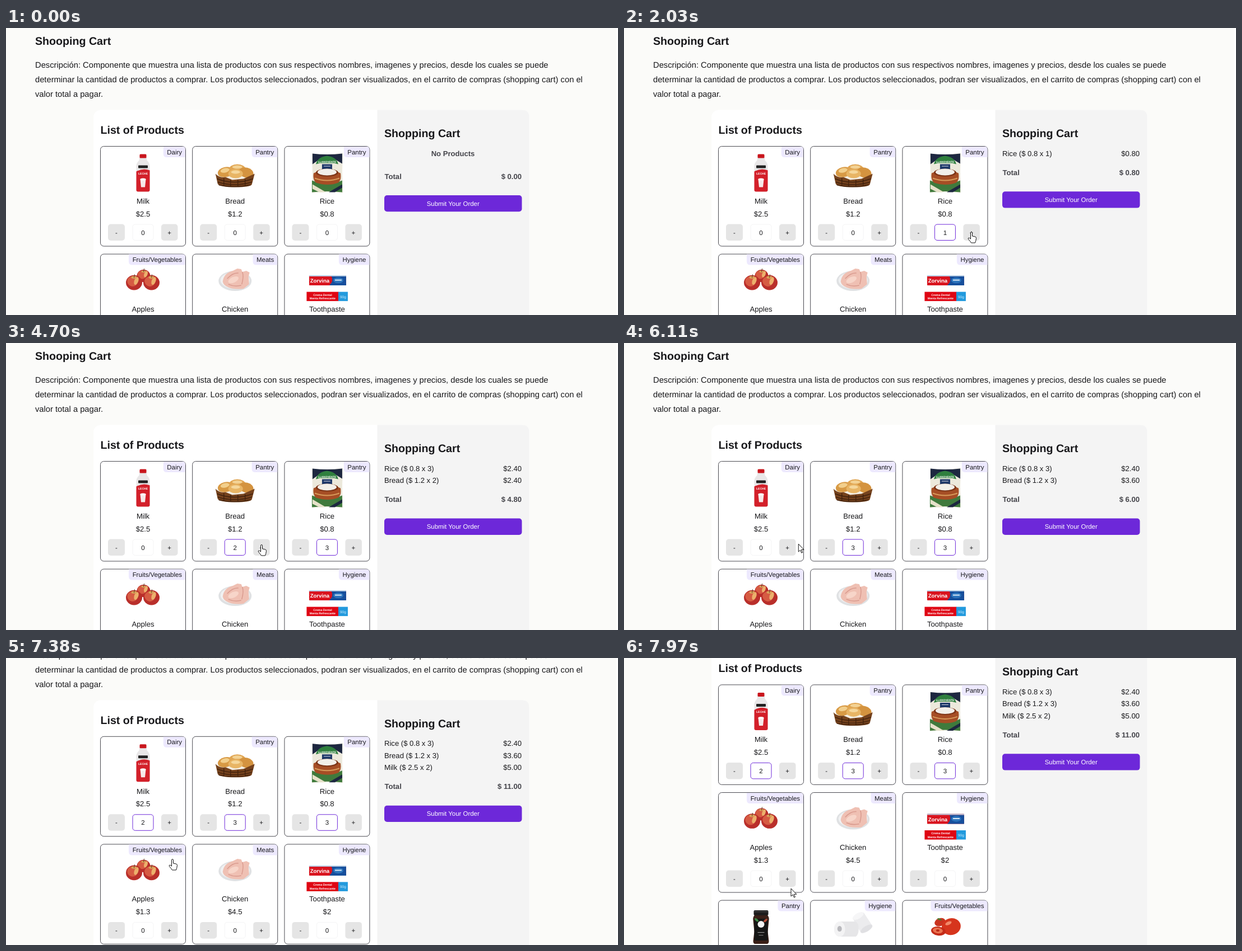
Write an HTML page that moves like this. It is 1092 px wide and 513 px high and loops after 8 s.

```html
<!DOCTYPE html>
<html lang="es">
<head>
<meta charset="utf-8">
<title>Shooping Cart</title>
<style>
html, body { margin: 0; width: 100%; height: 100%; overflow: hidden; background: #fbfbf9; }
svg { display: block; }
text { font-family: "Liberation Sans", Arial, sans-serif; text-rendering: geometricPrecision; white-space: pre; }
</style>
</head>
<body>
<svg width="1092" height="513" viewBox="0 0 1092 513">
  <g id="page"></g>
  <path fill="#fff" d="M1089 0h3v513h-3z"/>
  <path id="cursor" stroke="#111" stroke-linejoin="round"/>
</svg>
<script>
const LOOP = 8000, BIG = 19.64, LEAD = 14.73, BODY = 13.09, SMALL = 11.45;
const CARD = { x: 168.5, y: 211.5, dx: 164.2, dy: 192.6, w: 152, h: 178.5 };
const page = document.getElementById('page');
const cursor = document.getElementById('cursor');
const ctx = document.createElement('canvas').getContext('2d');
ctx.font = '100px "Liberation Sans", Arial, sans-serif';

// Drawing helpers
const text = (x, y, s, size = BODY, more = '') =>
  `<text x="${x}" y="${y}" font-size="${size}" fill="#18181b" ${more}>${s}</text>`;
const mid = (x, y, s, size, more = '') => text(x, y, s, size, 'text-anchor="middle" ' + more);
const end = (x, y, s, size, more = '') => text(x, y, s, size, 'text-anchor="end" ' + more);
const rect = (x, y, w, h, fill, r = 0, more = '') =>
  `<rect x="${x}" y="${y}" width="${w}" height="${h}" rx="${r}" fill="${fill}" ${more}/>`;
const oval = (x, y, rx, ry, fill, turn = 0) =>
  `<ellipse cx="${x}" cy="${y}" rx="${rx}" ry="${ry}" fill="${fill}" transform="rotate(${turn} ${x} ${y})"/>`;
const path = (d, fill, more = '') => `<path d="${d}" fill="${fill}" ${more}/>`;
const bold = 'style="font-weight:700"';
const white = 'style="font-weight:700;fill:#fff"';
const grey = 'style="font-weight:700;fill:#45454b"';

// Pictures: x from the middle of the card, y from its top
const milk = path('M-6 18h12l1 7q5 5 5 10v43q0 3-3 3h-18q-3 0-3-3V35q0-5 5-10z', '#e9e7e8')
  + rect(-6, 14, 12, 7, '#c9161d', 1.5)
  + path('M-12 45q12-7 24-2v35q0 3-3 3h-18q-3 0-3-3z', '#d3202a')
  + rect(-8.5, 34, 17, 5, '#222', 1)
  + mid(0, 50.5, 'LECHE', 5, white)
  + path('M-5 59h10l-1.5 14h-7z', '#f6e9e9') + oval(0, 59, 5, 2, '#fff');

const bread = oval(0, 54, 32, 9, '#f3eee4')
  + oval(-17, 46, 14, 9, '#d89a45', -12) + oval(4, 41, 15, 9, '#e0a552')
  + oval(20, 47, 13, 9, '#d4933f', 14) + oval(1, 49, 13, 8, '#e8b565')
  + oval(-18, 43, 8, 4, '#f2cf8c', -12) + oval(4, 37, 9, 3, '#f3d294') + oval(1, 46, 8, 3, '#f5d79c')
  + path('M-35 49q7 8 18 6l12 5 20-2 20-9-5 19q-2 5-29 5-29 0-32-6z', '#75421d')
  + path('M-32 58q30 12 64 0M-31 64q30 9 61 0M-29 69q28 6 56 0M-20 57v14M-8 60v12M5 60v12M18 59v12',
    'none', 'stroke="#42220d" stroke-width="1.4"');

const rice = path('M-27 13q27 3 55-1l-1 35 1 36q-27-3-55 0l1-35z', '#ece9dc')
  + path('M-26 13q26 3 53 0v18l-15-9h-24l-14 10z', '#1d2740')
  + path('M-27 61l14 5 27 0 13-5v21q-27-3-54 0z', '#3f7a3c')
  + path('M-26 68l24 14h-12l-12-6z', '#e6e1c9') + path('M3 82l24-14v6l-13 8z', '#1d2740')
  + path('M-20 32q3-13 20-15 17 2 20 15l-7-2h-26z', '#2f7f3e')
  + mid(0, 29.5, 'LLANOVENTE', 4.8, white)
  + rect(-9, 32, 18, 10, '#1c3768') + rect(-6, 35, 12, 1, '#d7d9e4')
  + path('M-24 48q24-12 48 0 2 12-4 17-18 7-40 0-6-6-4-17z', '#a64e25')
  + oval(0, 47, 20, 7, '#7d3517') + oval(0, 46, 17, 6, '#f2efe9')
  + path('M-22 57q22 8 44 0', 'none', 'stroke="#d79b5a" stroke-width="2"');

const apple = (x, y, r) => oval(x, y, r, r * .92, '#b92f2b')
  + oval(x - 3, y - 2, r * .65, r * .6, '#d65b43', 25) + oval(x + 4, y - 3, r * .25, r * .5, '#ecb06c', 20)
  + oval(x, y - r * .65, r * .35, r * .16, '#d9a05a')
  + path(`M${x} ${y - r * .6}l1-6`, 'none', 'stroke="#5b3a20"');
const apples = apple(1, 39, 12) + apple(-16, 51, 14.5) + apple(15, 51, 14.5);

const chicken = oval(0, 48, 29.5, 18, '#dfe1e3') + oval(0, 47, 26, 15, '#f0f1f2')
  + path('M-22 49q2-15 18-19l8-4 7 1 2 5 7-2 6 3-2 7 1 14-10 8q-20 2-30-4-6-3-7-9z', '#efc0b3')
  + path('M-14 44q10-11 20-10M13 32q3 8-1 22M-12 54q11 5 23 2', 'none', 'stroke="#d99a8e" stroke-width="1.5"')
  + oval(-3, 46, 10, 5, '#f7d5c9', -25);

const toothpaste = rect(-32, 38, 66, 18, '#d9141f', 1) + path('M8 40h26v16H4q8-7 4-16z', '#164f9c')
  + path('M-32 38h66v2H-32z', '#b7cde4') + oval(20, 47, 9, 5, '#2d75bd') + rect(14, 45.5, 12, 2, '#dceaf7')
  + mid(-13, 51, 'Zorvina', 9.5, white)
  + rect(-36.5, 67.5, 57, 16.5, '#df0613') + rect(20, 67.5, 17, 16.5, '#229add')
  + mid(-8, 74.5, 'Crema Dental', 5.2, white) + mid(-8, 81, 'Menta Refrescante', 5.2, white)
  + mid(28.5, 78.5, '90g', 6.5, 'style="fill:#d5efff"');

const coffee = path('M-11 26h22q4 4 3 10l-2 20 2 17q0 5-4 5h-20q-4 0-4-5l2-17-2-20q-1-6 3-10z', '#3b2018')
  + rect(-13, 18, 26, 9, '#1d1c1c', 2) + rect(-12, 20, 24, 1, '#555')
  + rect(-12, 33, 24, 39, '#161616', 2)
  + oval(-8, 35, 4, 2, '#3c8a45', 40) + oval(8, 36, 4, 2, '#b64b35', -40)
  + oval(0, 43, 6, 6, '#f4f4f4') + rect(-6, 57, 12, 1, '#aaa') + rect(-4, 62, 8, 1, '#888');

const paper = path('M-1 32l20-10 15 23-20 13z', '#ececee') + oval(24, 51, 12, 5, '#e0e0e3', -32)
  + oval(9, 28, 11, 5, '#f6f6f7', -30)
  + path('M-24 38H5q5 3 5 13t-5 14h-29z', '#e6e6e8') + oval(-24, 51.5, 10, 13.5, '#f3f3f4')
  + oval(-24, 51, 4, 5, '#b9b9bd');

const tomatoes = oval(-9, 39, 10, 7, '#c93420', -20) + oval(11, 47, 17, 15, '#d6351d', -12)
  + oval(6, 41, 6, 3, '#f08a6b', -25) + oval(-12, 55, 13, 8, '#c42b18', 8)
  + oval(-13, 54, 9, 5, '#ea7350', 8) + oval(-13, 54, 3, 2, '#bb2a18') + oval(-10, 34, 4, 1.5, '#4b7d31', 20);

const products = [
  ['Milk', 2.5, 'Dairy', milk], ['Bread', 1.2, 'Pantry', bread], ['Rice', .8, 'Pantry', rice],
  ['Apples', 1.3, 'Fruits/Vegetables', apples], ['Chicken', 4.5, 'Meats', chicken],
  ['Toothpaste', 2, 'Hygiene', toothpaste],
  ['Coffee', 3, 'Pantry', coffee], ['Paper', 2, 'Hygiene', paper], ['Tomatoes', 1, 'Fruits/Vegetables', tomatoes]
];

// Clicks on the plus buttons: time, product index
const clicks = [[1990, 2], [2320, 2], [2720, 2], [4140, 1], [4530, 1], [4930, 1], [6360, 0], [6660, 0]];

function card([name, price, tag, picture], i, qty) {
  const x = CARD.x + i % 3 * CARD.dx, y = CARD.y + Math.floor(i / 3) * CARD.dy;
  const left = CARD.w - 13 - ctx.measureText(tag).width * SMALL / 100;
  return `<g transform="translate(${x} ${y})">`
    + rect(0, 0, CARD.w, CARD.h, '#fff', 6, 'stroke="#4b4b52"')
    + path(`M${left} .5H147Q151.5 .5 151.5 6V19.5H${left + 6}q-6 0-6-6z`, '#ede9fe')
    + end(145.5, 14.2, tag, SMALL)
    + `<g transform="translate(76 0)">${picture}</g>`
    + mid(76, 102.5, name) + mid(76, 125, '$' + price)
    + rect(13.5, 139, 30, 29.5, '#e5e5e5', 5) + mid(28.5, 158, '-', SMALL)
    + rect(57.5, 139.5, 37, 28.5, '#fff', 4.5, `stroke="${qty ? '#6d28d9' : '#f4f4f5'}"`) + mid(76, 158, qty, SMALL)
    + rect(108.5, 139, 29.5, 29.5, '#e5e5e5', 5) + mid(123, 158, '+', SMALL) + '</g>';
}

function cart(items) {
  let sum = 0, rows = '';
  [...items].forEach(([i, n], k) => {
    const [name, price] = products[i], y = 228.7 + 21.3 * k;
    sum += price * n;
    rows += text(675, y, `${name} ($ ${price} x ${n})`) + end(920, y, '$' + (price * n).toFixed(2));
  });
  const y = items.size ? 241.8 + 21.3 * items.size : 269.8;
  return text(675, 195, 'Shopping Cart', BIG, bold)
    + (rows || mid(797.5, 228.8, 'No Products', BODY, grey))
    + text(675.5, y, 'Total', BODY, grey) + end(920, y, '$ ' + sum.toFixed(2), BODY, grey)
    + rect(675, y + 29.2, 245.5, 29.3, '#6d28d9', 5)
    + mid(797.7, y + 48, 'Submit Your Order', SMALL, 'style="fill:#fff"');
}

function draw(count) {
  const items = new Map();
  for (const [, i] of clicks.slice(0, count)) items.set(i, (items.get(i) || 0) + 1);
  page.innerHTML = text(52, 30, 'Shooping Cart', BIG, bold)
    + [
      'Descripción: Componente que muestra una lista de productos con sus respectivos nombres, imagenes y precios, desde los cuales se puede',
      'determinar la cantidad de productos a comprar. Los productos seleccionados, podran ser visualizados, en el carrito de compras (shopping cart) con el',
      'valor total a pagar.'
    ].map((s, k) => text(52, 71 + 26 * k, s, LEAD)).join('')
    + rect(156, 146.5, 777.5, 800, '#fff', 13)
    + path('M662.5 146.5h258q13 0 13 13v780h-271z', '#f4f4f4')
    + text(168.5, 189, 'List of Products', BIG, bold)
    + products.map((p, i) => card(p, i, items.get(i) || 0)).join('')
    + cart(items);
}

// Pointer stops: time, x, y
const stops = [[240, 1070, 504], [600, 806, 293], [1040, 549, 366], [1070, 549, 366], [1250, 578, 370],
  [1290, 578, 370], [1860, 620, 365], [3290, 620, 365], [3910, 456, 361], [5200, 456, 361], [5300, 456, 342],
  [5480, 456, 342], [6260, 296, 361], [7090, 296, 361], [7120, 297, 360], [7540, 297, 360], [7970, 298, 412]];
const shapes = {
  arrow: ['M0 0V14l3.2-3 2.3 5 2-.9-2.3-4.8h4.6z', '#fff'],
  hand: ['M-1.5 11V1.2a1.5 1.5 0 0 1 3 0V7l5 1q2 .6 2 2.5l-.8 5-1.2 3.5H-.5q-1-2-5-6.5-1.2-2 .8-2.4 1.5 0 3.2 2z', '#fff'],
  beam: ['M-3-6.5h2l1 1 1-1h2M-3 6.5h2l1-1 1 1h2M0-5.5v11', 'none']
};
const smooth = (a, b, t) => {
  const p = Math.min(1, Math.max(0, (t - a) / (b - a)));
  return p * p * (3 - 2 * p);
};

function pointer(t) {
  const k = stops.findIndex(s => s[0] > t);
  if (k < 0) return stops[stops.length - 1].slice(1);
  const [t0, x0, y0] = stops[k - 1], [t1, x1, y1] = stops[k], p = smooth(t0, t1, t);
  return [x0 + (x1 - x0) * p, y0 + (y1 - y0) * p];
}

function shapeAt(x, y) {
  if (x > 675 && x < 920 && y > 299 && y < 328) return 'hand';
  const cx = (x - CARD.x) % CARD.dx, cy = (y - CARD.y) % CARD.dy;
  if (x > 649 || cy < 139 || cy > 168.5) return 'arrow';
  if (cx > 57 && cx < 95) return 'beam';
  return cx > 13 && cx < 43.5 || cx > 108 && cx < 138 ? 'hand' : 'arrow';
}

let shown = -1;
function frame() {
  const t = performance.now() % LOOP;
  const count = clicks.filter(c => c[0] <= t).length;
  if (count !== shown) draw(shown = count);
  const scroll = 163.6 * smooth(7265, 7519, t);
  page.setAttribute('transform', `translate(0 ${-scroll})`);
  cursor.style.display = t < 240 ? 'none' : '';
  if (t >= 240) {
    const [x, y] = pointer(t);
    // The pointer keeps its shape while the page scrolls under it
    const [d, fill] = shapes[shapeAt(x, y + (t > 7540 ? scroll : 0))];
    cursor.setAttribute('d', d);
    cursor.setAttribute('fill', fill);
    cursor.setAttribute('transform', `translate(${x} ${y})`);
  }
  requestAnimationFrame(frame);
}
frame();
</script>
</body>
</html>
```
